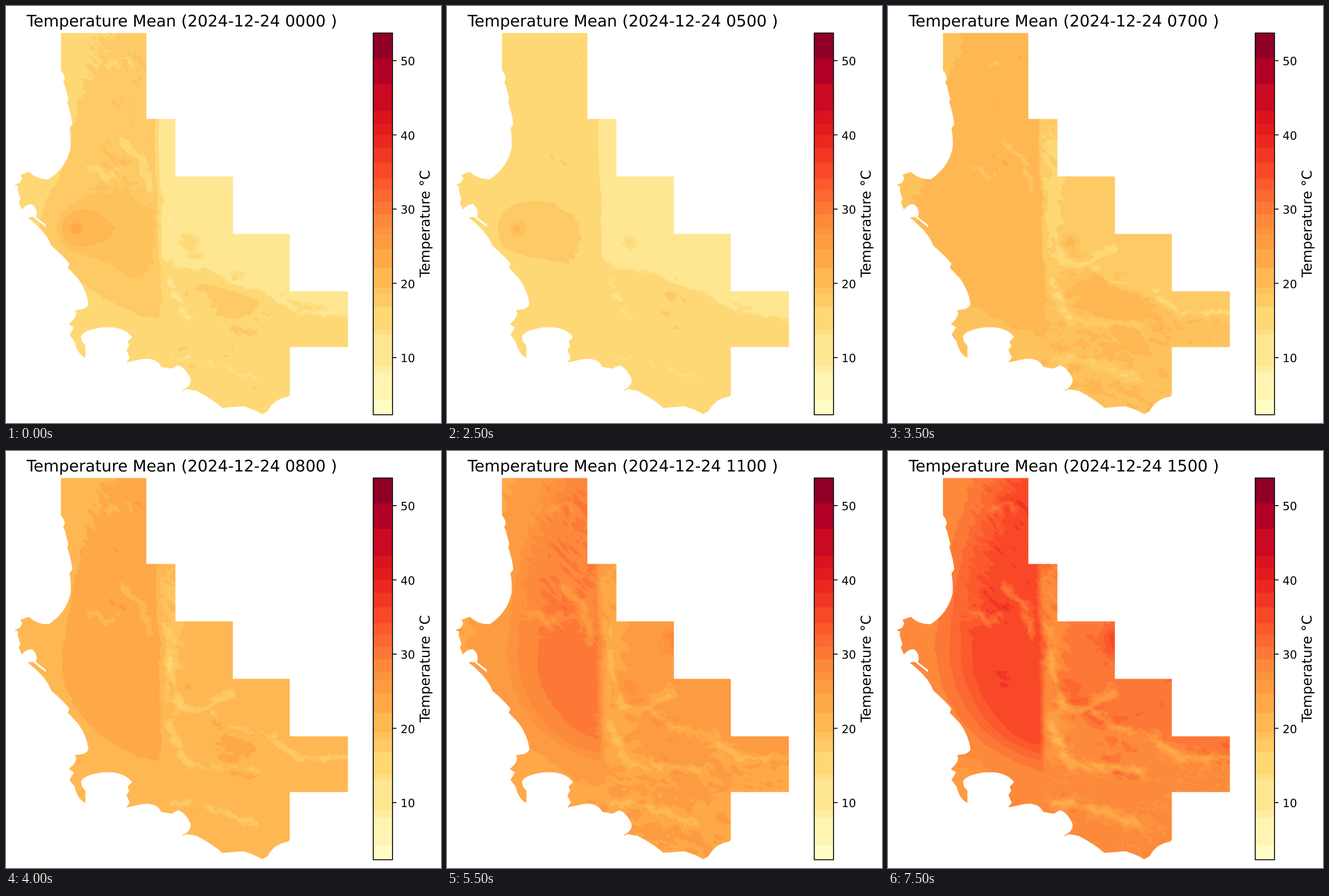
Write an HTML page with a canvas that moves like this. It is 764 px wide and 733 px high and loops after 8000 ms.

```html
<!DOCTYPE html>
<html lang="en">
<head>
<meta charset="utf-8">
<title>Temperature Mean</title>
<style>
html, body { margin: 0; width: 100%; height: 100%; overflow: hidden; background: #fff; }
canvas, svg { position: absolute; left: 0; top: 0; width: 764px; height: 733px; }
text { font-family: "DejaVu Sans", Verdana, sans-serif; text-rendering: geometricPrecision; }
</style>
</head>
<body>
<canvas id="map" width="764" height="733"></canvas>
<svg viewBox="0 0 764 733">
  <g id="bar" shape-rendering="crispEdges"></g>
  <rect x="645" y="47.5" width="33.8" height="671" fill="none" stroke="#000" stroke-width="1.6"/>
  <g id="ticks" font-size="20"></g>
  <text id="title" x="308.8" y="36" font-size="28" text-anchor="middle"></text>
  <text transform="translate(744 382.8) rotate(-90)" font-size="24" text-anchor="middle">Temperature °C</text>
</svg>
<script>
const W = 764, H = 733, STEP = 500, HOURS = 16;
const $ = id => document.getElementById(id);
const clamp = (v, a, b) => Math.max(a, Math.min(b, v));
const lerp = (a, b, t) => a + (b - a) * t;
const smooth = (a, b, v) => { const t = clamp((v - a) / (b - a), 0, 1); return t * t * (3 - 2 * t); };
const bump = (x, y, cx, cy, r) => Math.exp(-((x - cx) ** 2 + (y - cy) ** 2) / (r * r));

// Stepped inland border, south coast, bays, west coast
const outline = `M97,48H246V199H297V300H398V401H498V502H600V599H498V683
  L496,686Q470,690 459,712L450,717Q435,708 417,703L380,706Q365,692 335,676L318,673 310,676
  Q326,668 325,656Q316,635 302,631L291,637 273,634Q265,617 240,620L212,626
  218,618 212,605 217,597 214,590 222,582Q205,560 165,565Q135,570 131,581L133,590 139,597 139,618
  Q126,612 121,590L112,578 120,565 111,559Q128,545 122,535L136,533Q147,527 145,522
  Q142,500 127,479L109,460 112,453Q102,440 80,421Q74,403 52,383
  L39,372 47,371 71,390 70,384 53,371Q58,358 46,348Q36,347 28,357L23,345 26,340 21,324 22,317 16,315
  25,311 29,303 26,297 40,292Q55,306 75,305Q106,285 114,250Q115,230 112,215L117,208
  Q115,190 108,169L110,164 104,140 101,134 104,127Q102,118 97,113Z`;

// Mountain crests
const crests = ['280,310 290,380 302,440', '303,447 330,457 390,424', '365,460 400,485 465,503 510,538 600,541',
  '285,482 320,548 445,566', '295,617 385,634 440,657', '205,240 236,268 254,320', '150,285 178,302 202,288', '182,104 218,92'];

// Colour scale: band edges as heights on the bar, bottom to top
const edges = [719, 692, 645, 632, 577, 569, 529, 507, 495, 460, 427, 402, 389,
  366, 344, 323, 303, 275, 249, 227, 207, 184, 137, 92, 47];
const ramp = ['ffffcc', 'ffeda0', 'fed976', 'feb24c', 'fd8d3c', 'fc4e2a', 'e31a1c', 'bd0026', '800026']
  .map(c => [0, 2, 4].map(i => parseInt(c.slice(i, i + 2), 16)));
const barY = t => 618 - (t - 10) * 13.05;

function rampColour(y) {
  const p = clamp((718 - y) / 671, 0, .999) * 8, i = Math.floor(p);
  return ramp[i].map((c, k) => Math.round(lerp(c, ramp[i + 1][k], p - i)));
}
const lut = [];
for (let i = 0; i + 1 < edges.length; i++) {
  const lo = edges[i], hi = edges[i + 1], c = rampColour((lo + hi) / 2);
  for (let y = hi; y < lo; y++) lut[y] = c;
  $('bar').innerHTML += `<rect x="645" y="${hi}" width="34" height="${lo - hi}" fill="rgb(${c})"/>`;
}
for (let t = 10; t <= 50; t += 10) {
  const y = barY(t);
  $('ticks').innerHTML += `<path d="M679,${y}h7" stroke="#000" stroke-width="1.6"/><text x="693" y="${y + 8}">${t}</text>`;
}

// Value noise, about -1 to 1
function hash(x, y) {
  let n = Math.imul(x, 374761393) + Math.imul(y, 668265263);
  n = Math.imul(n ^ (n >>> 13), 1274126177);
  return ((n ^ (n >>> 16)) >>> 0) / 2147483648 - 1;
}
function noise(x, y) {
  const i = Math.floor(x), j = Math.floor(y);
  const u = smooth(0, 1, x - i), v = smooth(0, 1, y - j);
  return lerp(lerp(hash(i, j), hash(i + 1, j), u), lerp(hash(i, j + 1), hash(i + 1, j + 1), u), v);
}
function fbm(x, y) {
  let sum = 0;
  for (let o = 0, amp = .6; o < 4; o++, amp *= .55, x = x * 2 + 17, y = y * 2 + 31) sum += amp * noise(x, y);
  return sum;
}
const veins = (x, y) => .55 - 2.2 * Math.abs(fbm(x, y));

const segments = crests.flatMap(line => {
  const p = line.split(' ').map(s => s.split(',').map(Number));
  return p.slice(1).map(([x, y], i) => ({ x: p[i][0], y: p[i][1], dx: x - p[i][0], dy: y - p[i][1] }));
});
function crestDistance(x, y) {
  return Math.sqrt(Math.min(...segments.map(s => {
    const px = x - s.x, py = y - s.y;
    const t = clamp((px * s.dx + py * s.dy) / (s.dx ** 2 + s.dy ** 2), 0, 1);
    return (px - t * s.dx) ** 2 + (py - t * s.dy) ** 2;
  })));
}

const divide = y => 255 + y * .025;
const eastOf = (x, y) => smooth(-4, 12, x - divide(y));

// Where each influence on the temperature is felt
const features = {
  valley(x, y) {
    const mid = 122 + (y > 340 ? .0028 : .0008) * (y - 340) ** 2;
    return smooth(mid - 75, mid + 70, x) * (1 - eastOf(x, y)) * smooth(600, 490, y);
  },
  plateau: (x, y) => eastOf(x, y) * smooth(25, -15, y - 355 - .32 * x),
  height(x, y) {
    const d = crestDistance(x + 8 * fbm(x / 16, y / 16), y + 8 * fbm(x / 16 + 50, y / 16));
    const north = smooth(330, 280, y);
    const belt = bump(x, 0, divide(y) + 28, 0, 24) * smooth(180, 260, y) * smooth(570, 510, y);
    const rough = Math.max(.04, .4 * north * smooth(105, 190, x), .25 * eastOf(x, y),
      .7 * belt, .7 * Math.exp(-((d / 24) ** 2)));
    // Slopes run south-east in the north and east in the south
    const a = north > 0 ? veins((x + y) / 60, (x - y) / 20) : 0;
    const b = north < 1 ? veins((x + y * .2) / 38, (y - x * .2) / 22) : 0;
    return .6 * Math.exp(-((d / 7) ** 2)) + .25 * belt + .6 * rough * lerp(b, a, north);
  },
  core: (x, y) => bump(x, y, 190, 410, 100),
  hotspot: (x, y) => Math.exp(-Math.hypot(x - 122, y - 391) / 25),
  desert: (x, y) => bump(x, y, 402, 335, 28),
  basin: (x, y) => bump(x, y, 320, 416, 20) + .6 * bump(x, y, 400, 510, 55),
  cape: (x, y) => bump(x, y, 125, 590, 45)
};

// How strong each influence is at a given hour
function climate(hour) {
  const sun = Math.max(0, (hour - 6) / 9) ** .68, dusk = Math.exp(-hour / 1.5), night = (1 - sun) ** 6;
  return {
    base: 15.4 + .8 * dusk + 12.6 * sun ** .78,
    valley: .6 + 1.3 * dusk + 6.8 * sun ** 1.2,
    plateau: -3.9 + 6 * sun ** .7,
    height: -(2.5 + 1.5 * dusk + 4.5 * sun),
    core: .9,
    hotspot: night * (4 + 2.7 * dusk),
    desert: -1.5 + 7 * sun,
    basin: 2.5,
    cape: -2.5 * sun
  };
}

const ctx = $('map').getContext('2d', { willReadFrequently: true });
const shape = new Path2D(outline);
ctx.fill(shape);
ctx.stroke(shape);
const image = ctx.getImageData(0, 0, W, H), px = image.data;
const land = [];
for (let i = 0; i < W * H; i++) if (px[i * 4 + 3]) land.push(i);

const names = Object.keys(features);
const fields = names.map(name => Float32Array.from(land, i => features[name](i % W, Math.floor(i / W))));

function draw(hour) {
  const now = climate(hour), weights = names.map(name => now[name]);
  for (let n = 0; n < land.length; n++) {
    let t = now.base;
    for (let k = 0; k < weights.length; k++) t += weights[k] * fields[k][n];
    const c = lut[clamp(Math.round(barY(t)), 47, 718)], i = land[n] * 4;
    px[i] = c[0]; px[i + 1] = c[1]; px[i + 2] = c[2];
  }
  ctx.putImageData(image, 0, 0);
  $('title').textContent = `Temperature Mean (2024-12-24 ${String(hour).padStart(2, '0')}00 )`;
}

let shown = 0;
draw(0);
const start = performance.now();
function tick() {
  const hour = Math.floor((performance.now() - start) / STEP) % HOURS;
  if (hour !== shown) draw(shown = hour);
  requestAnimationFrame(tick);
}
requestAnimationFrame(tick);
</script>
</body>
</html>
```
